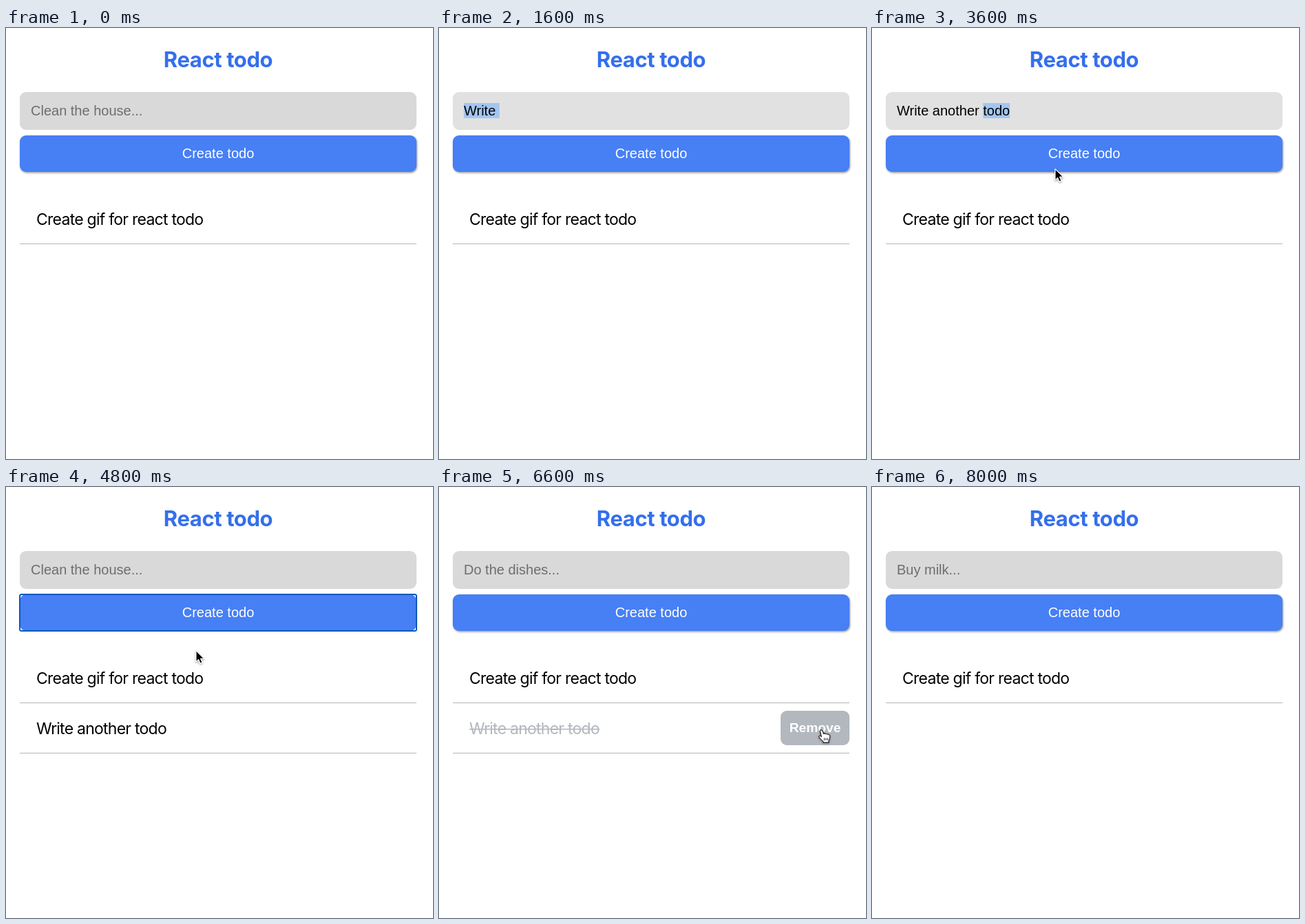
These frames come from a looping animation (620x626 px, 8800 ms). An HTML page with a canvas:

```html
<!DOCTYPE html>
<html lang="en">
<head>
<meta charset="utf-8">
<title>React todo</title>
<style>
  html, body { margin: 0; width: 100%; height: 100%; overflow: hidden; background: #fff; }
  canvas { display: block; }
</style>
</head>
<body>
<canvas id="stage" width="620" height="626"></canvas>
<script>
const ctx = document.getElementById('stage').getContext('2d');
const LOOP = 8800, TICK = 200;
const UI = '"Liberation Sans", Arial, sans-serif';
const HEAD = 'Inter, "Open Sans", sans-serif';
const GREY = '#b2b8be', BLUE = '#477ff5';

// Each step lists only what changes at that moment.
const steps = [
  { at: 0, value: '', hint: 'Clean the house...', select: null, mouse: null,
    ring: false, second: false, done: false, hot: false },
  ...[...'Write '].map((_, i) => ({ at: 200 * (i + 1), value: 'Write '.slice(0, i + 1) })),
  { at: 1600, select: [0, 6] },
  { at: 1800, select: null, value: 'Write an' },
  { at: 2000, value: 'Write anoth' },
  { at: 2200, value: 'Write another ' },
  { at: 2800, value: 'Write another to' },
  { at: 3000, value: 'Write another todo' },
  { at: 3600, select: [14, 18], mouse: ['arrow', 266, 205] },
  { at: 3800, select: null, mouse: ['hand', 269, 189] },
  { at: 4000, value: '', ring: true, second: true },
  { at: 4800, mouse: ['arrow', 276, 238] },
  { at: 5000, mouse: ['arrow', 279, 300] },
  { at: 5200, mouse: ['arrow', 281, 348] },
  { at: 5400, ring: false, done: true, hint: 'Do the dishes...' },
  { at: 6400, mouse: ['arrow', 446, 350] },
  { at: 6600, hot: true, mouse: ['hand', 556, 354] },
  { at: 7000, second: false, done: false, hot: false, hint: 'Buy milk...',
    mouse: ['arrow', 552, 349] },
  { at: 8000, mouse: null }
];

const stateAt = t => Object.assign({}, ...steps.filter(s => s.at <= t));

function box(x, y, w, h, r, fill) {
  ctx.beginPath();
  ctx.roundRect(x, y, w, h, r);
  ctx.fillStyle = fill;
  ctx.fill();
}

function text(str, x, y, font, color, { align = 'left', gap = 0 } = {}) {
  ctx.font = font;
  ctx.letterSpacing = gap + 'px';
  ctx.textAlign = align;
  ctx.fillStyle = color;
  ctx.fillText(str, x, y);
}

function drawInput({ value, hint, select }) {
  const font = '20px ' + UI;
  box(20, 93, 576, 55, 9, value ? '#e1e1e1' : '#d9d9d9');
  if (select) {
    ctx.font = font;
    ctx.letterSpacing = '0px';
    const [a, b] = select.map(n => 36 + ctx.measureText(value.slice(0, n)).width);
    box(a, 109, b - a, 22, 0, '#a3c6f1');
  }
  text(value || hint, 36, 127, font, value ? '#000' : '#6e6e6e');
}

function drawButton(ring) {
  ctx.save();
  if (!ring) {
    ctx.shadowColor = 'rgba(0,0,0,.4)';
    ctx.shadowBlur = 3;
    ctx.shadowOffsetX = 1;
    ctx.shadowOffsetY = 1.5;
  }
  box(20, 156, 576, 53, 9, BLUE);
  ctx.restore();
  if (ring) {
    ctx.beginPath();
    ctx.roundRect(20, 156, 576, 53, 2.5);
    ctx.strokeStyle = '#0c58b8';
    ctx.lineWidth = 2;
    ctx.stroke();
  }
  text('Create todo', 308, 189, '20px ' + UI, '#fff', { align: 'center' });
}

function drawItem(str, y, done, hot) {
  text(str, 44, y, '23px ' + HEAD, done ? GREY : '#000', { gap: -0.75 });
  if (done) {
    box(44, y - 8, ctx.measureText(str).width, 1.6, 0, GREY);
    if (hot) box(496, y - 34, 100, 50, 9, GREY);
    text('Remove', 546, y - 3, 'bold 19.2px ' + UI, hot ? '#fff' : GREY, { align: 'center' });
  }
  box(20, y + 27, 576, 1, 0, '#b4b7b9');
}

const shapes = {
  arrow: { d: new Path2D('M0 0V15.6L3.6 12.2L6 18L8.8 16.8L6.4 11.2H11.3Z'),
           fill: '#000', line: '#fff' },
  hand: { d: new Path2D('M-2.5 1.2C-3 -1 .2 -1.6 1 .6L2.4 5C3 3.7 5 3.8 5.5 5.1' +
            'C6.6 4.2 8.2 4.6 8.6 5.8C10 5.2 11.4 6 11.5 7.6C11.8 11 10.5 12.4 9.8 15' +
            'V17H2V15.5C0 14-2.2 11.4-4 9.4C-4.8 8-3 6.8-1.6 8L-.5 9Z' ),
          fill: '#fff', line: '#222' }
};

function drawMouse([kind, x, y]) {
  const { d, fill, line } = shapes[kind];
  ctx.save();
  ctx.translate(x, y);
  ctx.lineJoin = 'round';
  ctx.shadowColor = 'rgba(0,0,0,.4)';
  ctx.shadowBlur = 3;
  ctx.shadowOffsetY = 1.5;
  ctx.strokeStyle = line;
  ctx.lineWidth = 1.5;
  ctx.stroke(d);
  ctx.shadowColor = 'transparent';
  ctx.fillStyle = fill;
  ctx.fill(d);
  if (kind === 'hand') {
    ctx.lineWidth = 1;
    ctx.stroke(d);
    ctx.stroke(new Path2D('M3.4 10.5V14M5.8 10.5V14M8.2 10.5V14'));
  } else {
    ctx.lineWidth = 1;
    ctx.stroke(d);
  }
  ctx.restore();
}

function draw(t) {
  const s = stateAt(t);
  box(0, 0, 620, 626, 0, '#fff');
  text('React todo', 308, 57, 'bold 31px ' + HEAD, '#346fec', { align: 'center', gap: -0.4 });
  drawInput(s);
  drawButton(s.ring);
  drawItem('Create gif for react todo', 286, false, false);
  if (s.second) drawItem('Write another todo', 359, s.done, s.hot);
  if (s.mouse) drawMouse(s.mouse);
}

const start = performance.now();
function loop() {
  const t = (performance.now() - start) % LOOP;
  draw(Math.floor(t / TICK) * TICK);
  requestAnimationFrame(loop);
}
loop();
</script>
</body>
</html>
```
